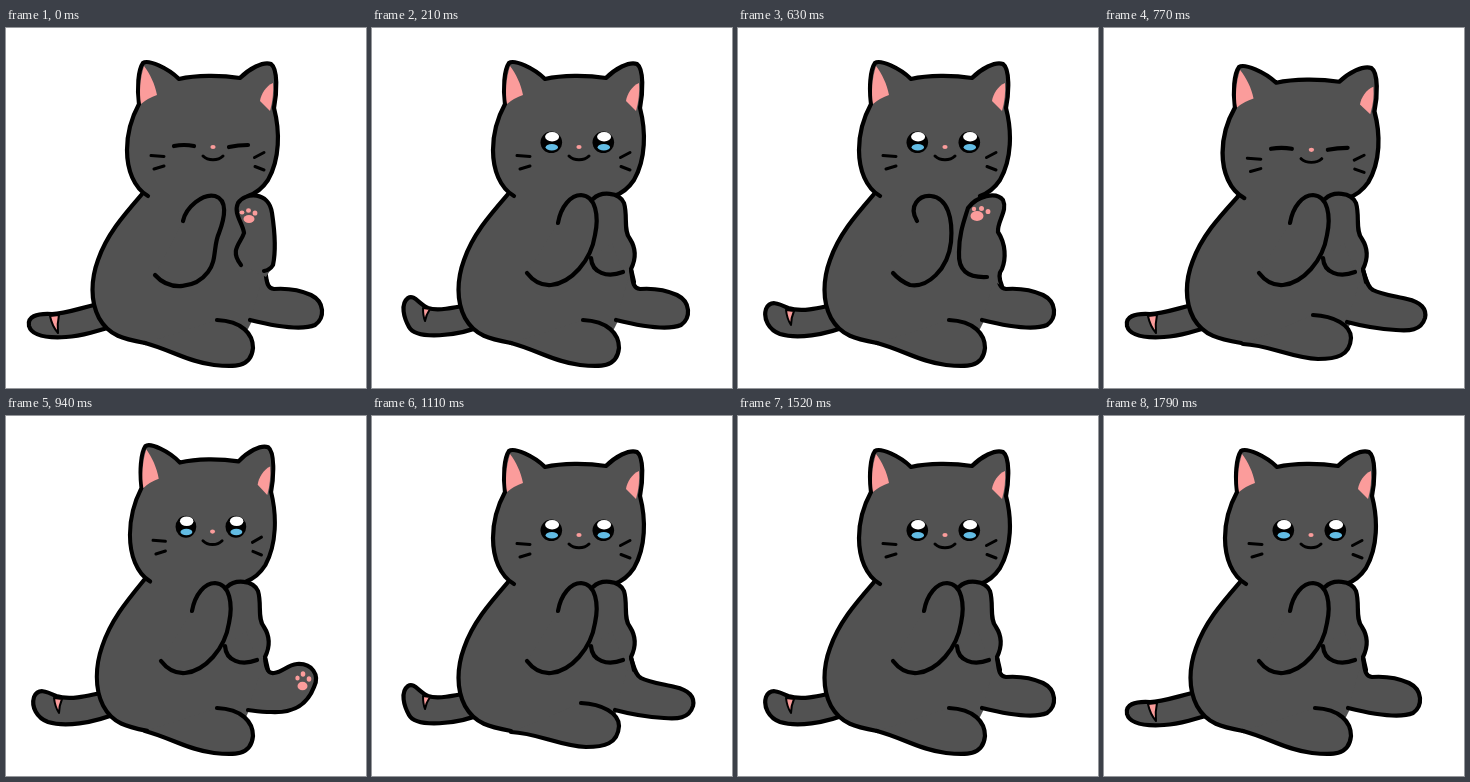
Recreate the animation shown at these times as an HTML page. Size 360x360 px, loop 1920 ms.

```html
<!DOCTYPE html>
<html lang="en">
<head>
<meta charset="utf-8">
<title>Clapping cat</title>
<style>
html, body { margin: 0; width: 100%; height: 100%; overflow: hidden; background: #fff; }
svg { display: block; width: 100vw; height: 100vh; }
path, ellipse { stroke: none; fill: none; }
.fur { fill: #525252; }
.ink { stroke: #000; stroke-width: 4.2; stroke-linecap: round; stroke-linejoin: round; }
.thin { stroke-width: 3; }
.hair { stroke-width: 2; }
.pink { fill: #fb9c9b; }
.black { fill: #000; }
.white { fill: #fff; }
.blue { fill: #62bce4; }
</style>
</head>
<body>
<svg id="stage" viewBox="0 0 360 360"></svg>
<script>
const path = (kind, d) => `<path class="${kind}" d="${d}"/>`;
const oval = (kind, x, y, rx, ry = rx) =>
  `<ellipse class="${kind}" cx="${x}" cy="${y}" rx="${rx}" ry="${ry}"/>`;
const limb = d => path('fur ink', d);
const line = d => path('ink', d);
const whisker = d => path('ink thin', d);
const stripe = d => path('pink ink hair', d);

const tails = {
  A: limb('M110 272C75 279 61 286 46 286C30 285 21 289 23 298C26 309 44 310 60 309C76 308 92 303 114 296')
    + stripe('M44 288L53 287Q51 296 52 305Q46 298 44 288Z'),
  B: limb('M110 273C76 282 62 284 50 280C40 275 32 272 28 281C25 291 31 302 42 306C58 311 86 308 114 296')
    + stripe('M48 282L56 283Q53 290 53 297Q49 291 48 282Z'),
  C: limb('M110 274C77 281 65 283 56 280C47 276 42 266 36 270C28 276 32 290 37 299C44 312 86 309 114 296')
    + stripe('M51 280L58 281Q54 287 53 293Q51 288 51 280Z')
};

const leftLeg = limb('M211 292C236 293 247 306 247 320C245 340 228 339 208 337C182 334 165 322 139 315');
const tuckedLeg = limb('M209 287C230 288 247 297 247 310C246 328 232 331 214 331C188 330 165 317 139 316');

const legs = {
  N: limb('M259 242C261 252 260 260 268 261C282 260 294 262 305 267C319 274 319 290 309 297C295 303 268 298 244 292') + leftLeg,
  E: limb('M259 242C262 250 263 259 269 262C276 266 290 268 303 271C317 274 323 281 321 290C317 303 305 303 292 302C275 301 258 298 243 294') + tuckedLeg,
  R: limb('M259 242C260 252 262 258 268 257C277 256 281 249 291 248C306 247 314 259 308 271C300 292 284 297 265 296C256 296 250 295 242 294') + leftLeg
    + oval('pink', 296.5, 270, 5, 4.3) + oval('pink', 291.5, 262, 2.2, 2.6)
    + oval('pink', 297, 258, 2.3, 2.7) + oval('pink', 303, 263, 2.3, 2.7)
};

const arms = {
  // halfway open
  H: path('fur', 'M231 178C233 165 263 160 266 185C268 205 270 223 267 238L260 249L235 237C223 222 235 215 238 205Z')
    + line('M235 237C223 222 235 215 238 205C237 195 227 186 232 175C239 164 263 163 266 185C269 205 270 223 267 237Q264 242 258 243')
    + limb('M177 193C180 179 197 165 209 168C222 172 219 189 213 205C207 218 211 233 202 244C190 260 164 264 149 247')
    + oval('pink', 243, 191, 5.5, 4) + oval('pink', 236, 184.5, 2.4, 2)
    + oval('pink', 242.5, 182.5, 2.5, 2.2) + oval('pink', 249, 185, 2.4, 2.6),
  // wide open
  W: limb('M249 249C229 250 220 242 221 224C221 206 226 193 230 180C239 168 258 163 265 172C270 183 259 193 260 204C268 216 268 231 264 241Q259 247 264 258')
    + limb('M179 193C170 178 181 167 193 168C210 170 215 191 213 214C210 242 189 260 172 257Q162 253 155 245')
    + oval('pink', 239, 188, 6.5, 5) + oval('pink', 236, 181, 2.2)
    + oval('pink', 243.5, 180.5, 2.5) + oval('pink', 250, 183.5, 2.4, 2.6),
  // hands together
  C: path('fur', 'M221 171C229 163 247 164 252 175C256 188 251 203 258 211C265 222 263 233 259 241L251 244L221 225Z')
    + line('M221 171C229 163 247 164 252 175C256 188 251 203 258 211C265 222 263 233 259 241L262 254')
    + limb('M186 195C189 178 199 167 209 167C224 168 227 188 223 207C219 233 199 255 179 257Q165 258 155 245')
    + path('fur', 'M219 230C220 245 235 250 251 244L240 215Z') + line('M219 230C220 245 235 250 251 244')
};

const openEye = x => oval('black', x, 114.3, 10.8)
  + oval('white', x + .8, 108.8, 7, 4.7) + oval('blue', x + .5, 119.3, 6.2, 3.2);
const eyes = {
  open: openEye(179.3) + openEye(231.3),
  closed: line('M168 118Q178 116 188 118') + line('M223 119Q232 117 242 117')
};

const flank = 'M137 165C118 187 101 206 92 232C85 251 84 273 93 290C103 308 118 311 139 315';
const torso =
  path('fur', flank + 'L215 332L242 301L246 293L266 262L259 242L245 160Z') + line(flank);
const head =
  limb('M142 168C128 160 121 142 121 122C121 102 127 87 133 76C131 60 132 42 137 35C142 31 162 40 173 51C190 47 215 47 234 50C243 41 257 33 265 36C272 41 271 65 268 80C274 103 274 131 262 152Q254 164 242 168')
  + path('pink', 'M138 38C144 46 149 56 151 67Q142 70 135 76C133 65 134 50 138 38Z')
  + path('pink', 'M267 55C260 58 255 66 254 73L264 83Q268 69 267 55Z');
const face = oval('pink', 207, 119, 2.6, 2.1)
  + whisker('M197 128C202 133 212 133 217 128')
  + whisker('M145 127.5L158 128.5M148 141L158 138M248.5 129.5L258 124.5M249 138.5L258 142');

// One letter or value per drawing.
const tailOrder = 'ABBCCCCBBBAAABBCCCCBBBAA';
const armOrder = 'HWHCHWHCHWHC'.padEnd(24, 'C');
const legOrder = 'NNNNNNNNNNN' + 'ENRRENRRENRRN';
const blinks = [0, 1, 10, 11, 12, 21, 22];
const squash = { 10: .5, 11: 1, 12: .3, 13: -1.2, 14: -.5 };
const durations = [...Array(13).fill(70), 100, 100, 70, 70, 100, 100, 70, 70, 100, 100, 130];
const loop = durations.reduce((sum, d) => sum + d);

function poseAt(time) {
  let rest = time % loop, pose = 0;
  while (rest >= durations[pose]) rest -= durations[pose++];
  return pose;
}

const stage = document.getElementById('stage');
function draw(pose) {
  const s = squash[pose] || 0;
  const bounce = `translate(195 320) scale(${1 + .033 * s} ${1 - .014 * s}) translate(-195 -320)`;
  stage.innerHTML = tails[tailOrder[pose]]
    + `<g transform="${bounce}">${torso}</g>`
    + legs[legOrder[pose]]
    + `<g transform="${bounce}">${head}${face}${eyes[blinks.includes(pose) ? 'closed' : 'open']}</g>`
    + arms[armOrder[pose]];
}

const start = performance.now();
let shown = -1;
function tick() {
  const pose = poseAt(performance.now() - start);
  if (pose !== shown) draw(shown = pose);
  requestAnimationFrame(tick);
}
tick();
</script>
</body>
</html>
```
